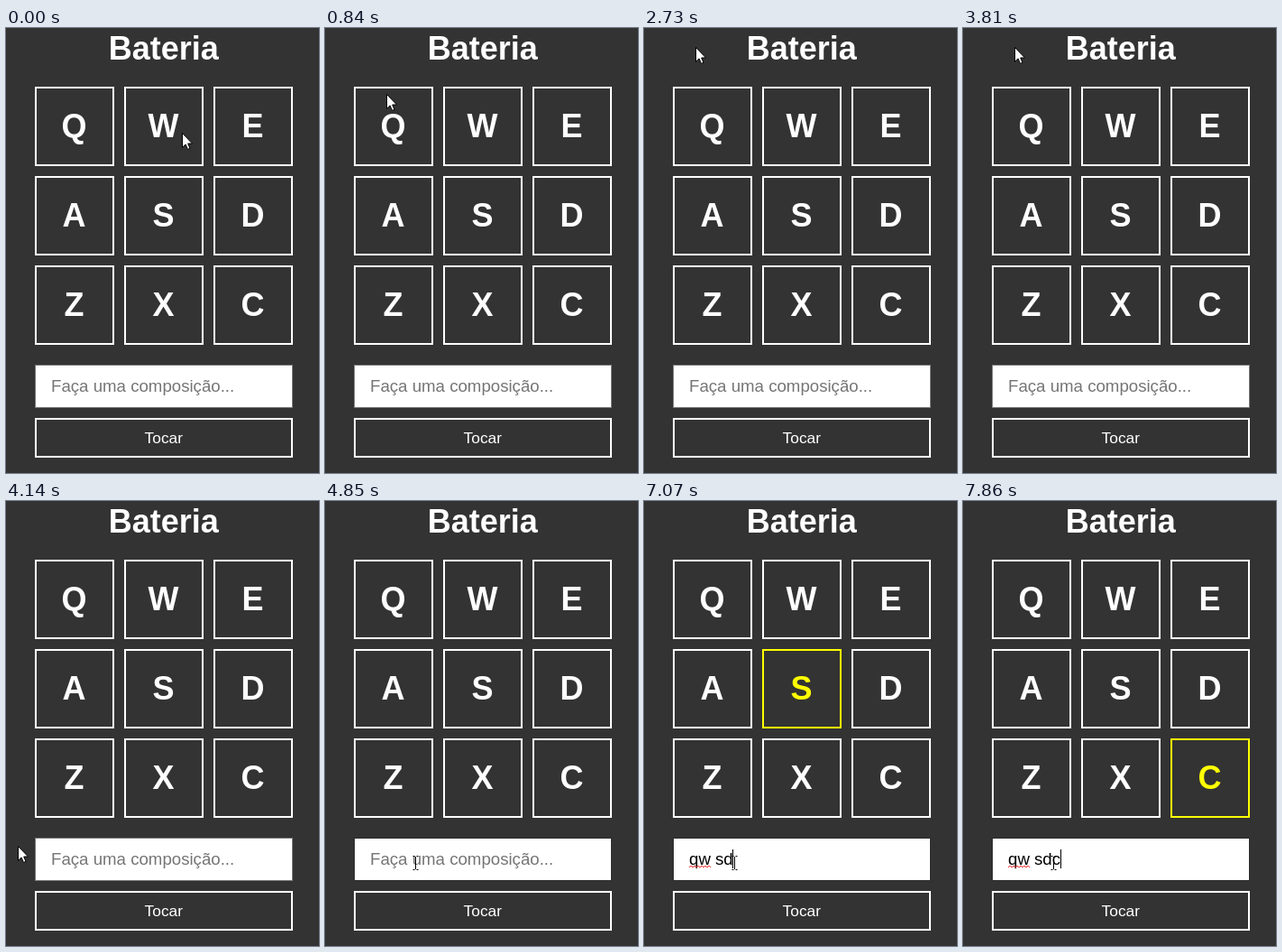
Animation of 347x493 px, one loop 8 s. Source, as an HTML page:

```html
<!DOCTYPE html>
<html lang="pt">
<head>
<meta charset="utf-8">
<title>Bateria</title>
<style>
  html, body { margin: 0; width: 100%; height: 100%; overflow: hidden; background: #333; }
  svg { display: block; width: 347px; height: 493px; font-family: Arial, "Liberation Sans", sans-serif; }
  text { white-space: pre; }
  .big { font-size: 36px; font-weight: bold; fill: #fff; text-anchor: middle; }
  .box { fill: none; stroke: #fff; stroke-width: 2; }
  .on .box { stroke: #ff0; }
  .on .big { fill: #ff0; }
  .entry { font-size: 18.67px; }
</style>
</head>
<body>
<svg id="stage" viewBox="0 0 347 493">
  <rect width="347" height="493" fill="#333"/>
  <text class="big" x="174.7" y="35">Bateria</text>
  <g id="keys"></g>
  <rect id="field" x="32.5" y="373.5" width="285" height="47" fill="#fff"/>
  <text id="hint" class="entry" x="50" y="403" fill="#757575">Faça uma composição...</text>
  <text id="typed" class="entry" x="50" y="403" fill="#000"></text>
  <path id="wave" fill="none" stroke="#e33" stroke-width="1"/>
  <rect id="caret" y="386" width="1" height="21" fill="#000"/>
  <rect class="box" x="33" y="433" width="284" height="42"/>
  <text x="174.8" y="460" font-size="17.33" fill="#fff" text-anchor="middle">Tocar</text>
  <path id="arrow" d="M.5 .5V16.3L4.1 12.9L6.5 18.4L9 17.4L6.7 12H11.5Z" fill="#fff" stroke="#000"/>
  <path id="beam" d="M-3 -7.5H-1M1 -7.5H3M0 -7V7M-3 7.5H-1M1 7.5H3" fill="none" stroke="#000"/>
</svg>
<script>
const LOOP = 8000;
const FOCUS = 4370;
const $ = id => document.getElementById(id);

// key, lit from, lit until
const hits = [
  ['Q', 1620, 1930], ['W', 2460, 2730], ['E', 3040, 3330], ['S', 3530, 3810],
  ['Q', 5060, 5340], ['W', 5620, 5930], ['S', 6780, 7100], ['D', 7190, 7530],
  ['C', 7860, 8000]
];

// time, text, caret visible
const typing = [
  [0, '', 0], [FOCUS, '', 1], [4850, '', 0],
  [4880, 'q', 1], [5390, 'q', 0], [5500, 'qw', 1], [6020, 'qw', 0],
  [6200, 'qw ', 1], [6660, 'qw s', 1], [7070, 'qw sd', 1], [7590, 'qw sd', 0],
  [7710, 'qw sdc', 1]
];

// time, x, y of the pointer
const path = [
  [0, 195, 116], [90, 160, 106], [180, 100, 90], [270, 70, 85],
  [810, 70, 85], [870, 66, 60], [930, 58, 28], [960, 57, 21],
  [3840, 57, 21], [3930, 36, 95], [4020, 15, 230], [4110, 8, 360],
  [4170, 17, 404], [4230, 45, 404], [4290, 85, 402], [4340, 100, 401]
];

const keys = {};
[...'QWEASDZXC'].forEach((letter, i) => {
  const x = 32 + i % 3 * 99, y = 65 + Math.floor(i / 3) * 99;
  $('keys').insertAdjacentHTML('beforeend',
    `<g><rect class="box" x="${x + 1}" y="${y + 1}" width="86" height="86"/>` +
    `<text class="big" x="${x + 43.5}" y="${y + 56}">${letter}</text></g>`);
  keys[letter] = $('keys').lastElementChild;
});

let wave = 'M50 406';
for (let x = 52, up = true; x <= 74; x += 2, up = !up) wave += `L${x} ${up ? 404 : 406}`;
$('wave').setAttribute('d', wave);

const show = (id, on) => $(id).setAttribute('visibility', on ? 'visible' : 'hidden');

// The pointer is sampled every 30 ms, so it moves in small jumps.
function pointer(t) {
  t = t < 4340 ? Math.floor(t / 30) * 30 : t;
  const i = path.findIndex(p => p[0] > t);
  if (i < 0) return path[path.length - 1].slice(1);
  const [t0, x0, y0] = path[i - 1], [t1, x1, y1] = path[i];
  const k = (t - t0) / (t1 - t0);
  return [Math.round(x0 + (x1 - x0) * k), Math.round(y0 + (y1 - y0) * k)];
}

function draw(t) {
  for (const letter in keys) {
    const lit = hits.some(([k, from, to]) => k === letter && t >= from && t < to);
    keys[letter].setAttribute('class', lit ? 'on' : '');
  }

  const [, text, blink] = typing.filter(s => s[0] <= t).pop();
  $('typed').textContent = text;
  const width = text ? $('typed').getComputedTextLength() : 0;
  $('caret').setAttribute('x', Math.floor(50 + width));
  show('caret', blink);
  show('hint', !text);
  show('wave', text.includes(' '));
  $('field').setAttribute('stroke', t < FOCUS ? '#767676' : '#2c2c2c');

  const [x, y] = pointer(t);
  const inField = x >= 32 && x < 318 && y >= 373 && y < 421;
  $('arrow').setAttribute('transform', `translate(${x} ${y})`);
  $('beam').setAttribute('transform', `translate(${x + .5} ${y})`);
  show('arrow', !inField);
  show('beam', inField);
}

const start = performance.now();
function tick() {
  draw((performance.now() - start) % LOOP);
  requestAnimationFrame(tick);
}
tick();
</script>
</body>
</html>
```
